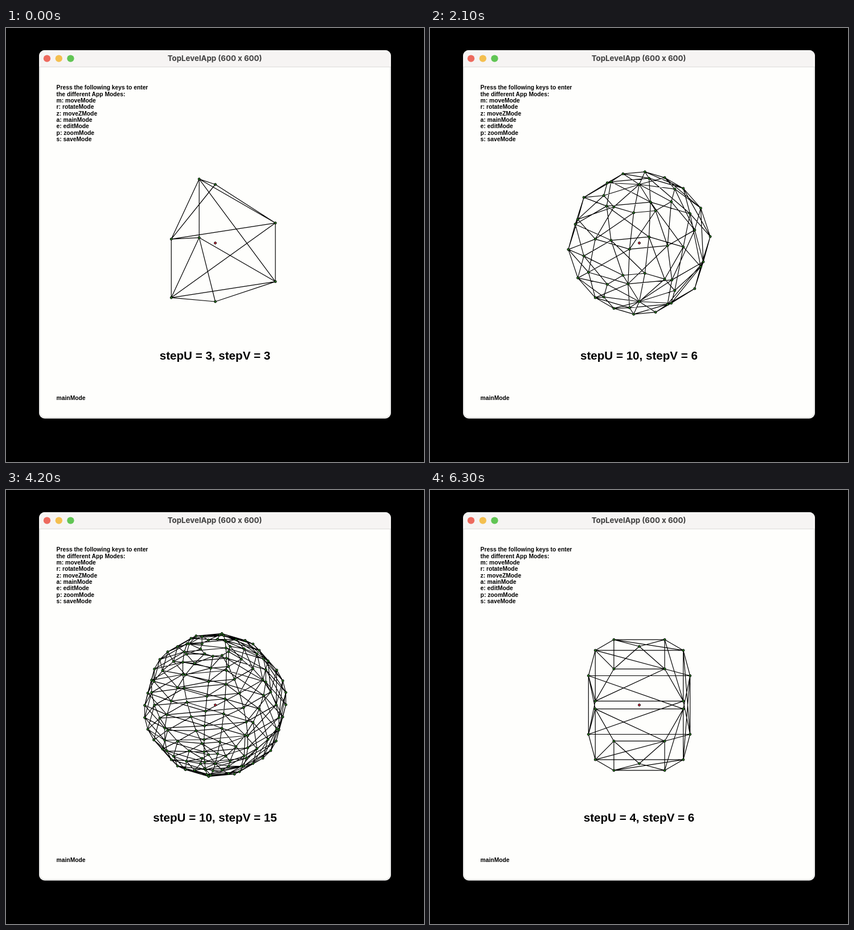
These frames come from a looping animation (734 by 763 pixels, 7000 ms). An HTML page:

```html
<!DOCTYPE html>
<html lang="en">
<head>
<meta charset="utf-8">
<title>Sphere mesh</title>
<style>
  html, body { margin: 0; width: 100%; height: 100%; overflow: hidden; background: #000; }
  svg { display: block; width: 734px; height: 763px; }
  text { font: bold 10.3px "Liberation Sans", Arial, sans-serif; fill: #000; white-space: pre; }
  #title { font: 700 13.3px Inter, sans-serif; fill: #3f3f3f; }
  #label { font-size: 20.6px; }
  #title, #label { text-anchor: middle; }
  #wire { fill: none; stroke: #000; stroke-width: 1.2; }
  #dots { fill: #2a7a22; stroke: #000; }
  #center { fill: #dc2f45; stroke: #000; }
</style>
</head>
<body>
<svg viewBox="0 0 734 763">
  <defs>
    <clipPath id="frame"><rect x="58" y="39" width="618" height="647.5" rx="10"/></clipPath>
  </defs>
  <g clip-path="url(#frame)">
    <rect x="58" y="39" width="618" height="648" fill="#fefefc"/>
    <rect x="59.2" y="60" width="615.6" height="625.2" rx="9" fill="none" stroke="#ebebea" stroke-width="2.4"/>
    <rect x="58" y="39" width="618" height="29" fill="#f6f4f3"/>
    <rect x="58" y="68" width="618" height="1" fill="#dddcdb"/>
  </g>
  <circle cx="72" cy="53.6" r="6.2" fill="#ed6a5e"/>
  <circle cx="92.8" cy="53.6" r="6.2" fill="#f4bf4f"/>
  <circle cx="113.4" cy="53.6" r="6.2" fill="#61c554"/>
  <text id="title" x="366.6" y="58">TopLevelApp (600 x 600)</text>
  <g id="help"></g>
  <text x="88.6" y="653.8">mainMode</text>
  <path id="wire"/>
  <path id="dots"/>
  <circle id="center" cx="367.5" cy="378" r="2"/>
  <text id="label" x="367" y="582.8"></text>
</svg>
<script>
const RADIUS = 103, CX = 367.5, CY = 378, HOLD = 700;
const byId = id => document.getElementById(id);

const help = ["Press the following keys to enter", "the different App Modes:", "m: moveMode",
  "r: rotateMode", "z: moveZMode", "a: mainMode", "e: editMode", "p: zoomMode", "s: saveMode"];
byId("help").innerHTML = help.map((line, i) =>
  `<text x="88.6" y="${108.3 + i * 11.36}">${line}</text>`).join("");

// Isometric view: x runs down-left, y down-right, z up.
function project(u, v) {
  const x = Math.cos(v) * Math.cos(u), y = Math.cos(v) * Math.sin(u), z = Math.sin(v);
  return [CX + RADIUS * (y - x) * Math.sqrt(3) / 2, CY + RADIUS * ((x + y) / 2 - z)];
}

const format = p => p.map(n => n.toFixed(2)).join(" ");
const segment = (p, q) => `M${format(p)}L${format(q)}`;
const dot = ([x, y]) => `M${format([x - 2, y])}a2 2 0 1 0 4 0a2 2 0 1 0 -4 0`;

// Rings go from the south pole up; an open mesh stops one ring below the north pole.
function buildMesh([stepU, stepV, open]) {
  const last = open ? stepV - 1 : stepV;
  const at = (i, j) => project(j * 2 * Math.PI / stepU, i * Math.PI / stepV - Math.PI / 2);
  let wire = "", dots = "";
  for (let i = 0; i <= last; i++) {
    const pole = i === 0 || i === stepV;
    for (let j = 0; j < stepU; j++) {
      const p = at(i, j);
      if (!pole) wire += segment(p, at(i, j + 1));
      if (i < last) wire += segment(p, at(i + 1, j)) + segment(p, at(i + 1, j + 1));
      if (!pole || j === 0) dots += dot(p);
    }
  }
  return { wire, dots, label: `stepU = ${stepU}, stepV = ${stepV}` };
}

const meshes = [[3, 3], [4, 6], [6, 6], [10, 6], [10, 15, true], [20, 20]].map(buildMesh);
const steps = 2 * (meshes.length - 1);
let shown = -1;

function draw(now) {
  const step = Math.floor(now / HOLD) % steps;
  const index = Math.min(step, steps - step);
  if (index !== shown) {
    shown = index;
    const mesh = meshes[index];
    byId("wire").setAttribute("d", mesh.wire);
    byId("dots").setAttribute("d", mesh.dots);
    byId("label").textContent = mesh.label;
  }
  requestAnimationFrame(draw);
}
draw(performance.now());
</script>
</body>
</html>
```
